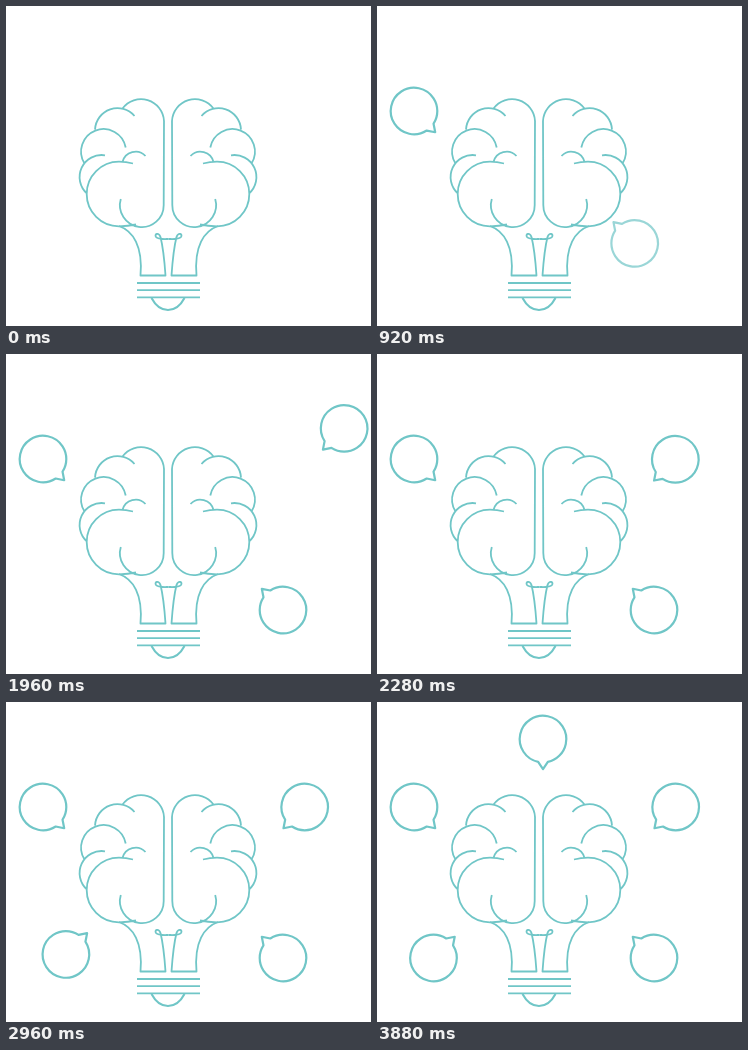
Write an HTML page with a canvas that moves like this. It is 365 by 320 pixels and loops after 4000 ms.

```html
<!DOCTYPE html>
<html lang="en">
<head>
<meta charset="utf-8">
<title>Brain bulb</title>
<style>
  html, body { margin: 0; width: 100%; height: 100%; overflow: hidden; background: #fff; }
  canvas { display: block; }
</style>
</head>
<body>
<canvas id="stage" width="365" height="320"></canvas>
<script>
const ctx = document.getElementById('stage').getContext('2d');
const LOOP = 4000, STEP = 40, SLOT = LOOP / 5, RISE = 360;
const CENTER = { x: 166, y: 170 };

// Left halves; the right halves are mirrored
const brain = new Path2D(`
  M116.5 102.5A23 23 0 0 1 158 115L157.7 199A21.9 21.9 0 1 1 114.8 193
  M89 123.5A22.5 22.5 0 0 1 128.5 110
  M78.5 157.5A22.5 22.5 0 1 1 119.7 141.5
  M81 187.5A22 22 0 0 1 99 149.3
  M127 157.5Q120 155.7 113 155.7A32.3 32.3 0 0 0 113 220.3Q122 220.3 130 218.5
  M116.5 156A13.5 13.5 0 0 1 139.5 150`);
const bulb = new Path2D(`
  M113 220C127 225 137 240 134.5 269.5H159.5
  C158.5 255 157 241 154.5 231C152.5 226 148 228 150 231C152 233.5 157 233 162.5 233`);
const cap = new Path2D('M145.5 292C154 308 170 308 178.5 292');

// Each bubble flies out from (dx, dy) off its rest and overshoots by a share of that
const bubbles = [
  { x: 37, y: 105, dx: 77, dy: 44, over: 0.09 },
  { x: 277, y: 256, dx: -56, dy: -54, over: 0.31 },
  { x: 298.7, y: 105, dx: -58, dy: 45, over: 0.68 },
  { x: 56.5, y: 256, dx: 104, dy: -110, over: 0.18 },
  { x: 166, y: 37, dx: 0, dy: 48, over: 0.125 }
];

const rise = age => Math.sin(Math.PI / 2 * Math.min(1, age / RISE));
const settle = age => Math.exp(-age / 120) * Math.cos(Math.PI * age / 220);

// 1 at the starting point, 0 at rest, negative beyond it
function displacement(age, over) {
  return age < RISE ? 1 - (1 + over) * rise(age) : -over * settle(age - RISE);
}

function strokeMirrored(path, axis) {
  ctx.stroke(path);
  ctx.save();
  ctx.translate(2 * axis, 0);
  ctx.scale(-1, 1);
  ctx.stroke(path);
  ctx.restore();
}

function drawBulb() {
  ctx.lineWidth = 1.8;
  strokeMirrored(brain, 162);
  strokeMirrored(bulb, 162.5);
  for (let i = 0; i < 3; i++) {
    ctx.beginPath();
    ctx.moveTo(131, 277 + 7.2 * i);
    ctx.lineTo(194, 277 + 7.2 * i);
    ctx.stroke();
  }
  ctx.lineWidth = 2.1;
  ctx.stroke(cap);
}

function drawBubble({ x, y, dx, dy, over }, age) {
  if (age <= 0) return;
  const shift = displacement(age, over);
  const gap = Math.PI / 15;
  ctx.save();
  ctx.globalAlpha = Math.sqrt(rise(age));
  ctx.translate(x + dx * shift, y + dy * shift);
  ctx.rotate(Math.atan2(Math.sign(CENTER.y - y), Math.sign(CENTER.x - x)));
  ctx.lineWidth = 2.2;
  ctx.beginPath();
  ctx.arc(0, 0, 23.3, gap, -gap);
  ctx.lineTo(30, 0);
  ctx.closePath();
  ctx.stroke();
  ctx.restore();
}

function frame() {
  const t = Math.floor(performance.now() % LOOP / STEP) * STEP;
  ctx.clearRect(0, 0, 365, 320);
  ctx.strokeStyle = '#70c6c7';
  ctx.lineJoin = 'round';
  bubbles.forEach((bubble, i) => drawBubble(bubble, t - i * SLOT));
  drawBulb();
  requestAnimationFrame(frame);
}
frame();
</script>
</body>
</html>
```
